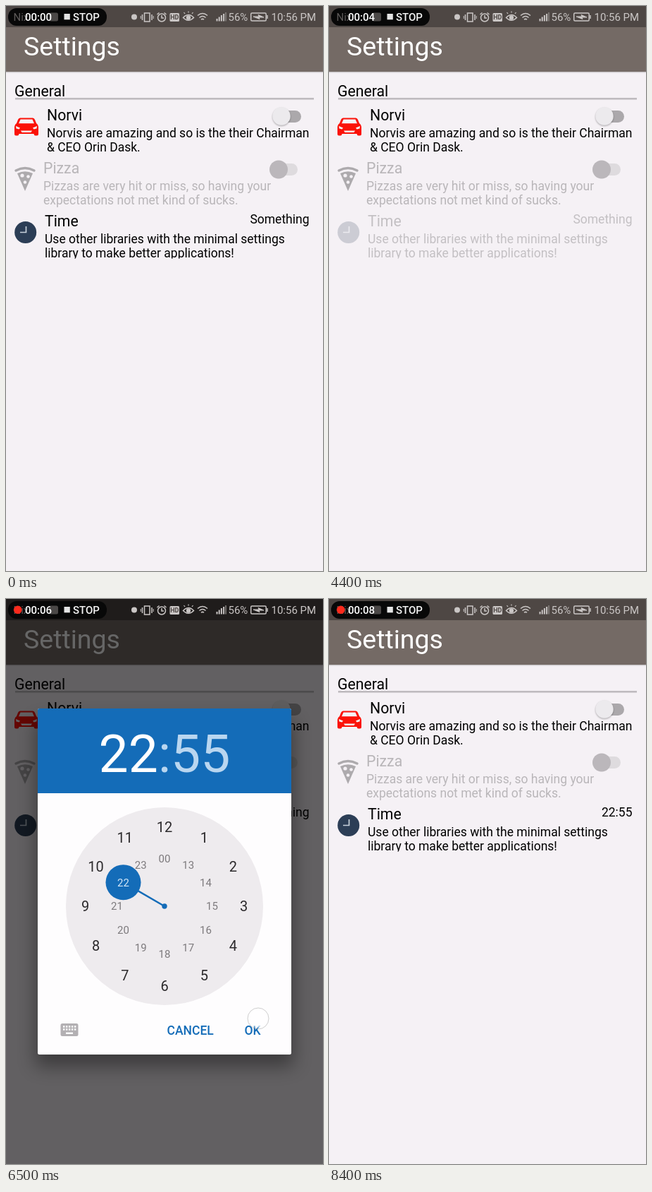
Recreate the animation shown at these times as an HTML page. Size 450 by 800 pixels, loop 8.7 s.

```html
<!DOCTYPE html>
<html lang="en">
<head>
<meta charset="utf-8">
<title>Settings</title>
<style>
html, body { margin: 0; width: 100%; height: 100%; overflow: hidden; background: #f5f1f5; }
svg { display: block; width: 450px; height: 800px; font-family: Roboto, sans-serif; }
.title { font-size: 21.25px; }
.body { font-size: 17.5px; }
.bar { font-size: 15px; }
.mid { text-anchor: middle; }
.end { text-anchor: end; }
.med { font-weight: 500; }
</style>
</head>
<body>
<svg viewBox="0 0 450 800">
  <defs>
    <filter id="soft" x="-20%" y="-20%" width="140%" height="140%"><feGaussianBlur stdDeviation="13"/></filter>
    <filter id="lift" x="-50%" y="-50%" width="200%" height="200%"><feGaussianBlur stdDeviation="1.3"/></filter>
    <linearGradient id="edge" x2="0" y2="1"><stop stop-color="#000" stop-opacity=".25"/><stop offset="1" stop-color="#000" stop-opacity="0"/></linearGradient>
    <clipPath id="rowClip"><rect y="285" width="450" height="72.5"/></clipPath>
  </defs>

  <rect width="450" height="800" fill="#f5f1f5"/>
  <rect width="450" height="93" fill="#746a65"/>
  <rect width="450" height="30" fill="#4e4744"/>
  <rect y="93" width="450" height="2" fill="url(#edge)"/>
  <text x="25" y="70" font-size="37.5" fill="#fff">Settings</text>
  <text class="title" x="12" y="128">General</text>
  <rect x="13" y="130" width="424" height="2.6" fill="#bfbbbf"/>

  <!-- car row -->
  <g fill="#fb1208">
    <path d="M20 158.5H38Q40 158.5 41 161L43 166Q46 168 46 171V181.500Q46 183.500 44 183.500H41.500Q40 183.500 39.500 181H18.500Q18 183.500 16.500 183.500H14Q12 183.500 12 181.500V171Q12 168 15 166L17 161Q18 158.500 20 158.500Z"/>
    <g fill="#f5f1f5">
      <path d="M20.500 160.500H37.500L40 166.200H18Z"/>
      <path d="M14 170L20 172.500L18.500 174.500L14.500 173.500Z"/>
      <path d="M44 170L38 172.500L39.500 174.500L43.500 173.500Z"/>
      <path d="M21 176.500H37L35.500 179H22.500Z"/>
    </g>
  </g>
  <text class="title" x="58" y="161.500">Norvi</text>
  <text class="body" x="58" y="185.500">Norvis are amazing and so is the their Chairman</text>
  <text class="body" x="58" y="206">&amp; CEO Orin Dask.</text>
  <rect id="track" x="388" y="148" width="31" height="17" rx="8.500"/>
  <circle id="thumbShade" cy="157.300" r="12.800" fill="#000" opacity=".28" filter="url(#lift)"/>
  <circle id="thumb" cy="156" r="12.700"/>

  <!-- pizza row -->
  <g fill="#b9b6b9">
    <text class="title" x="53" y="236.500">Pizza</text>
    <text class="body" x="53" y="260.500">Pizzas are very hit or miss, so having your</text>
    <text class="body" x="53" y="281">expectations not met kind of sucks.</text>
  </g>
  <path d="M14 233Q27 226 40 233" fill="none" stroke="#adaaad" stroke-width="3.400" stroke-linecap="round"/>
  <path d="M16 237Q27 231.500 38 237L27 262Z" fill="#adaaad"/>
  <g fill="#f5f1f5"><circle cx="23" cy="240" r="2.600"/><circle cx="31.500" cy="241.500" r="2.300"/><circle cx="27" cy="249.500" r="2.300"/></g>
  <rect x="383" y="223" width="31" height="17" rx="8.500" fill="#dedbde"/>
  <circle cx="387" cy="231.500" r="13" fill="#bbb7bb"/>

  <!-- time row -->
  <g id="timeRow">
    <g clip-path="url(#rowClip)">
      <circle cx="27.700" cy="320.500" r="15.500" fill="#2c3e56"/>
      <path d="M28.500 312V320.500H20" fill="none" stroke="#c6d0da" stroke-width="1.700"/>
      <text class="title" x="55" y="311.500">Time</text>
      <text class="body end" id="value" x="430.500" y="308"></text>
      <text class="body" x="55" y="335.500">Use other libraries with the minimal settings</text>
      <text class="body" x="55" y="356">library to make better applications!</text>
    </g>
  </g>

  <rect id="dim" width="450" height="800"/>

  <g id="dialog">
    <rect x="42" y="172" width="366" height="490" opacity=".38" filter="url(#soft)"/>
    <rect x="45" y="155" width="360" height="490" rx="2.500" fill="#fefdfe"/>
    <path d="M45 275V157.500Q45 155 47.500 155H402.500Q405 155 405 157.500V275Z" fill="#146cb8"/>
    <text class="mid" x="225" y="245" font-size="75" fill="#fff">22<tspan fill="#b9d6f0">:55</tspan></text>
    <circle cx="225" cy="435" r="140" fill="#eeebee"/>
    <path d="M225 435L166.500 401.200" stroke="#146cb8" stroke-width="2.500"/>
    <circle cx="225" cy="435" r="3.700" fill="#146cb8"/>
    <circle cx="166.500" cy="401.200" r="25" fill="#146cb8"/>
    <g id="hours" class="mid"></g>
    <rect x="77.500" y="601" width="25" height="18" rx="2.500" fill="#b3b0b3"/>
    <path d="M81 605.500H99.500M81 609.500H99.500" stroke="#fff" stroke-width="2.300" stroke-dasharray="2.400 1.600"/>
    <path d="M85 614.800H95" stroke="#fff" stroke-width="2.300"/>
    <rect id="press" x="310" y="588" width="80" height="45" rx="2.500" fill="#000"/>
    <g class="body med" fill="#146cb8"><text x="228.500" y="616.500">CANCEL</text><text x="338.500" y="616.500">OK</text></g>
  </g>

  <!-- status icons -->
  <g fill="none" stroke="#cac6c5" stroke-width="1.500">
    <circle cx="182" cy="15.500" r="4" fill="#cac6c5" stroke="none"/>
    <rect x="196.500" y="10" width="7.500" height="12"/>
    <path d="M193.500 12V20M207 12V20" />
    <path d="M191.300 14V18M209.200 14V18" stroke-width="1"/>
    <circle cx="221" cy="16.500" r="5.500"/>
    <path d="M221 13V17H224M214.500 12L217.500 9.500M227.500 12L224.500 9.500"/>
    <rect x="232.500" y="10" width="13.500" height="12" rx="1.500" fill="#cac6c5" stroke="none"/>
    <path d="M251.500 16.500Q259 8.500 266.500 16.500Q259 24 251.500 16.500Z"/>
    <circle cx="259" cy="16.500" r="2.400" fill="#cac6c5"/>
    <path d="M254 11L252.500 9M259 9.500V7.500M264 11L265.500 9" stroke-width="1.200"/>
    <path d="M272 13.500Q279 7.500 286 13.500M274.500 16.500Q279 12.500 283.500 16.500M277 19.300Q279 17.500 281 19.300"/>
    <path d="M299.500 18V21.500M302.700 15.500V21.500M305.900 13V21.500M309.100 11V21.500" stroke-width="2"/>
    <path d="M312 9V21.500" stroke="#8d8785"/>
    <rect x="347.700" y="10" width="21.500" height="11" rx="1.500"/>
    <path d="M371 13V18"/>
    <path d="M351 15H359L358 12.500L366 16H359L360 18.500Z" fill="#cac6c5" stroke-width="1"/>
  </g>
  <text class="mid" x="239.300" y="19.300" font-size="9" font-weight="700" fill="#4e4744">HD</text>
  <g class="bar" fill="#cac6c5"><text x="315.500" y="21">56%</text><text x="376.500" y="21">10:56 PM</text></g>

  <!-- recorder pill -->
  <rect x="3" y="3" width="140" height="25" rx="12" fill="#080808"/>
  <text class="bar" x="10.500" y="21" fill="#5d5a59">Nix</text>
  <rect x="61.500" y="9.500" width="12.500" height="12" rx="2.500" fill="#4b4847"/>
  <circle id="rec" cx="16.700" cy="15.300" r="5.800" fill="#fb2a1c"/>
  <text class="bar med" id="count" x="27" y="21" font-size="15" fill="#fff"></text>
  <rect x="82.500" y="11" width="8.300" height="8.300" fill="#e4e4e4"/>
  <text class="bar med" x="95" y="21" fill="#f4f4f4">STOP</text>

  <g id="touch">
    <circle r="15" fill="#fff" fill-opacity=".3" stroke="#777" stroke-opacity=".35"/>
    <circle r="12.500" fill="#fff" fill-opacity=".55"/>
  </g>
</svg>
<script>
const LOOP = 8700, STEP = 100;
const $ = id => document.getElementById(id);
const set = (id, name, value) => $(id).setAttribute(name, value);

// Linear interpolation through [time, value] points.
function track(points, t) {
  if (t <= points[0][0]) return points[0][1];
  for (let i = 1; i < points.length; i++) {
    const [a, x] = points[i - 1], [b, y] = points[i];
    if (t <= b) return x + (y - x) * (t - a) / (b - a);
  }
  return points[points.length - 1][1];
}
const mix = (a, b, k) => `rgb(${a.map((v, i) => Math.round(v + (b[i] - v) * k))})`;

const SECONDS = [700, 1700, 2700, 3800, 5100, 6000, 7100, 7800];
const REC_ON = [[200, 800], [1300, 1800], [2300, 2800], [3500, 3800], [4800, 5300],
  [5800, 6100], [6500, 7400], [7800, 8300], [8400, 8700]];
const SWITCH = [[1000, 0], [1250, 1], [2600, 1], [2850, 0]];
const ROW = [[4000, 1], [4200, .2], [4500, .2], [4800, 1]];
const DIM = [[4800, 0], [4980, .6], [6700, .6], [6800, .41], [6900, .14], [6980, 0]];
const DIALOG = [[4750, 0], [4800, .2], [4900, .75], [5000, 1], [6700, 1], [6800, .2], [6860, 0]];
const PRESS = [[6500, 0], [6600, .1], [6750, .1], [6900, 0]];
const TAPS = [
  { x: 417, y: 151, from: 700, to: 1100 },
  { x: 417, y: 151, from: 2300, to: 2700 },
  { x: 358, y: 594, from: 6500, to: 6900 }
];

function buildHours() {
  const dial = (n, label, radius, size, color) => {
    const a = n * Math.PI / 6;
    const x = 225 + radius * Math.sin(a), y = 435 - radius * Math.cos(a) + size * .356;
    return `<text x="${x}" y="${y}" font-size="${size}" fill="${color}">${label}</text>`;
  };
  let out = "";
  for (let n = 1; n <= 12; n++) {
    out += dial(n, n, 112.5, 20, "#2c2a2c");
    out += dial(n, n === 12 ? "00" : n + 12, 67.5, 15, n === 10 ? "#d5e7f7" : "#7d7a7d");
  }
  $("hours").innerHTML = out;
}

function render(t) {
  const on = track(SWITCH, t), x = 391 + 25 * on;
  set("track", "fill", mix([171, 168, 171], [151, 198, 221], on));
  set("thumb", "fill", mix([236, 234, 237], [82, 164, 199], on));
  set("thumb", "cx", x);
  set("thumbShade", "cx", x);

  set("timeRow", "opacity", track(ROW, t));
  $("value").textContent = t < 6900 ? "Something" : "22:55";
  set("dim", "opacity", track(DIM, t));
  set("dialog", "opacity", track(DIALOG, t));
  set("press", "opacity", track(PRESS, t));

  $("count").textContent = "00:0" + SECONDS.filter(s => t >= s).length;
  set("rec", "opacity", REC_ON.some(([a, b]) => t >= a && t < b) ? 1 : 0);

  const tap = TAPS.find(p => t >= p.from && t < p.to);
  set("touch", "opacity", tap ? 1 : 0);
  if (tap) set("touch", "transform", `translate(${tap.x} ${tap.y})`);
  // The switch shows through the finger marker.
  if (tap && tap.y < 200) set("touch", "opacity", .35);
}

buildHours();
const start = performance.now();
function tick() {
  const t = (performance.now() - start) % LOOP;
  render(Math.floor(t / STEP) * STEP);
  requestAnimationFrame(tick);
}
render(0);
requestAnimationFrame(tick);
</script>
</body>
</html>
```
